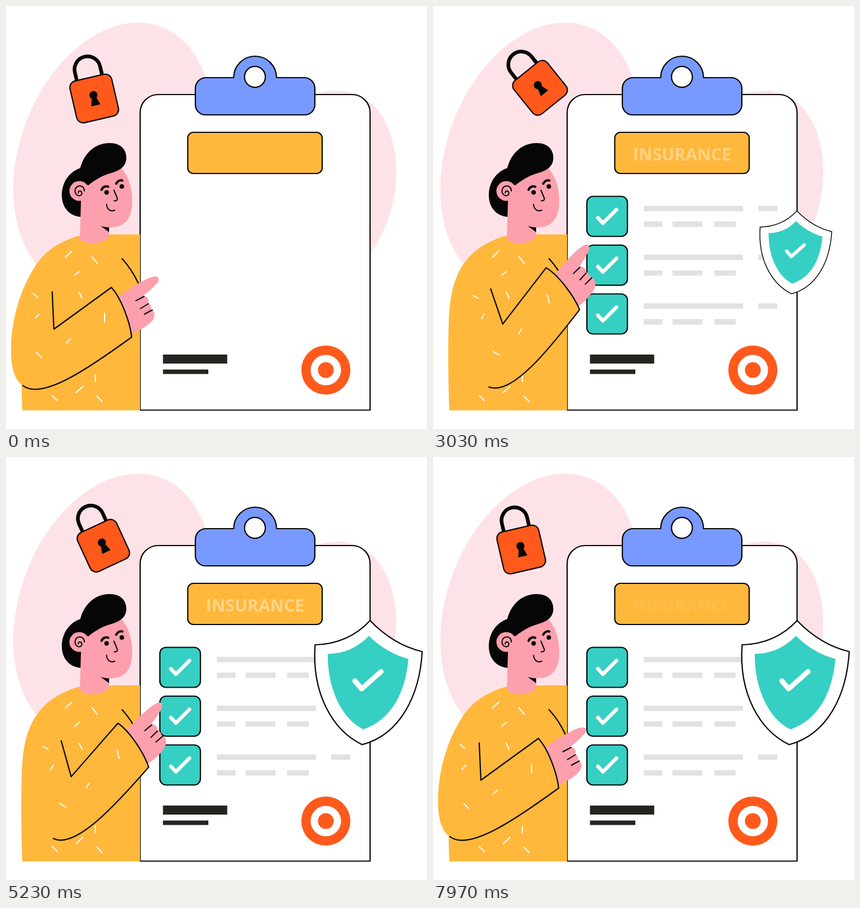
Recreate the animation shown at these times as an HTML page with a canvas. Size 747 by 750 pixels, loop 8.01 s.

```html
<!DOCTYPE html>
<html lang="en">
<head>
<meta charset="utf-8">
<title>Insurance checklist</title>
<style>
html, body { margin: 0; width: 100%; height: 100%; overflow: hidden; background: #fff; }
canvas { display: block; }
</style>
</head>
<body>
<canvas id="stage" width="747" height="750"></canvas>
<script>
const ctx = document.getElementById('stage').getContext('2d');
const LOOP = 8010;
const INK = '#060606', BLUSH = '#fde3e8', SKIN = '#fd9fad', YELLOW = '#ffb83b',
  ORANGE = '#ff591c', BLUE = '#7899ff', TEAL = '#36cfc3', GREY = '#e2e2e2', DARK = '#242520';
const ROWS = [373, 459.5, 546];

// ---- timing ----
const clamp = x => Math.min(1, Math.max(0, x));
const ease = (t, a, b) => { const x = clamp((t - a) / (b - a)); return x * x * (3 - 2 * x); };

// Smooth curve through [time, value] keys, at rest at both ends
function curve(keys, t) {
  const n = keys.length - 1;
  const slope = k => k === 0 || k === n ? 0 :
    (keys[k + 1][1] - keys[k - 1][1]) / (keys[k + 1][0] - keys[k - 1][0]);
  let i = 0;
  while (i < n - 1 && t >= keys[i + 1][0]) i++;
  const [t0, v0] = keys[i], [t1, v1] = keys[i + 1];
  const d = t1 - t0, u = clamp((t - t0) / d), w = 1 - u;
  return v0 * (1 + 2 * u) * w * w + slope(i) * d * u * w * w +
    v1 * u * u * (3 - 2 * u) - slope(i + 1) * d * u * u * w;
}

const LOCK_SWING = [[0, 0], [1030, 7.8], [2170, 21.2], [2900, 25.4], [3500, 26.6],
  [3730, 26.4], [4200, 24.6], [5230, 11.8], [6230, 3.7], [7200, 0.6], [8010, 0]];
const TITLE_FADE = [[0, 0], [1030, 0.03], [2170, 0.27], [3730, 0.45],
  [4200, 0.46], [5230, 0.41], [6230, 0.33], [7970, 0.08], [8010, 0.075]];
const ARM_LOWS = [0, 1935, 3895, 5905, 7815];

function armAngle(t) {
  for (let i = 0; i < ARM_LOWS.length - 1; i++) {
    const a = ARM_LOWS[i], b = ARM_LOWS[i + 1];
    if (t < b) return 8.5 * (1 - Math.cos(2 * Math.PI * (t - a) / (b - a)));
  }
  return 0;
}

function shieldScale(t) {
  return 1.1 * ease(t, 2470, 3450) - 0.1 * ease(t, 3450, 3950);
}

// ---- drawing helpers ----
function paint(path, fill, stroke, width = 2.2) {
  if (fill) { ctx.fillStyle = fill; ctx.fill(path); }
  if (stroke) { ctx.strokeStyle = stroke; ctx.lineWidth = width; ctx.stroke(path); }
}
const shape = (d, fill, stroke, width) => paint(new Path2D(d), fill, stroke, width);
function disc(x, y, r, fill, stroke, width) {
  const p = new Path2D();
  p.arc(x, y, r, 0, 7);
  paint(p, fill, stroke, width);
}
function box(x, y, w, h, r, fill, stroke) {
  const p = new Path2D();
  p.roundRect(x, y, w, h, r);
  paint(p, fill, stroke);
}
function bar(x, y, w, h, color) {
  ctx.fillStyle = color;
  ctx.fillRect(x, y, w, h);
}
// Draws around a pivot, turned counter-clockwise by deg and scaled
function around(x, y, deg, scale, draw) {
  if (scale <= 0) return;
  ctx.save();
  ctx.translate(x, y);
  ctx.rotate(-deg * Math.PI / 180);
  ctx.scale(scale, scale);
  draw();
  ctx.restore();
}

// ---- scene parts ----
function backdrop() {
  const blob = new Path2D();
  blob.ellipse(189.8, 265.9, 244.4, 165.6, -69.8 * Math.PI / 180, 0, 7);
  paint(blob, BLUSH);
  shape('M540 158C570 149 600 147 622 156C667 174 692.5 230 692.5 293C692.5 350 674 400 646 440H500Z', BLUSH);
}

function lock(t) {
  around(132, 81.8, 13 + curve(LOCK_SWING, t), 1, () => {
    ctx.translate(5.4, 0.6);
    ctx.lineCap = 'butt';
    shape('M-23 48V32A23 23 0 0 1 23 32V48', null, INK, 6.5);
    box(-38, 47, 76, 76, 12, ORANGE, INK);
    disc(0, 78.8, 7.2, INK);
    shape('M-3 80L-8.3 97.5H8.3L3 80Z', INK);
  });
}

function board(t) {
  box(238, 157, 408, 559.5, [32, 32, 0, 0], '#fff', INK);
  shape('M355 127H404A38 38 0 0 1 480 127H529A19 19 0 0 1 548 146V175A18 18 0 0 1 530 193' +
    'H354A18 18 0 0 1 336 175V146A19 19 0 0 1 355 127Z', BLUE, INK);
  disc(441.7, 125.7, 18.5, '#fff', INK);
  box(322.5, 224, 238.5, 73, 10, YELLOW, INK);

  ctx.globalAlpha = clamp(curve(TITLE_FADE, t));
  ctx.fillStyle = '#fff';
  ctx.font = 'bold 30px "Open Sans", "Noto Sans", sans-serif';
  ctx.textAlign = 'center';
  ctx.fillText('INSURANCE', 442, 274);
  ctx.globalAlpha = 1;

  bar(278.5, 618, 114, 16, DARK);
  bar(278.5, 644.5, 80.5, 8, DARK);
  disc(567.5, 645.5, 43.5, ORANGE);
  disc(567.5, 645.5, 27, '#fff');
  disc(567.5, 645.5, 14, ORANGE);
}

function checklist(t) {
  const tick = ease(t, 960, 1960), text = ease(t, 1650, 2630);
  for (const y of ROWS) {
    around(309, y, 0, tick, () => {
      box(-36, -35.5, 72, 71, 11, TEAL, INK);
      ctx.lineCap = ctx.lineJoin = 'round';
      shape('M-16.5 2.5L-7.5 12L16.5 -12', null, '#fff', 6.5);
      ctx.lineCap = 'butt';
    });
    around(374, y, 0, text, () => {
      bar(0, -18.7, 176, 9.6, GREY);
      bar(203, -18.7, 34, 9.6, GREY);
      bar(0, 9.2, 33, 9.6, GREY);
      bar(51, 9.2, 53, 9.6, GREY);
      bar(125, 9.2, 38, 9.6, GREY);
    });
  }
}

function shield(t) {
  around(645, 511, 0, shieldScale(t), () => {
    ctx.translate(-645, -511);
    ctx.lineJoin = 'miter';
    shape('M646 290C672 317 704 337 738.5 345C734 422 700 492 632 510C580 485 542 420 548.5 333' +
      'C586 332 620 318 646 290Z', '#fff', INK);
    shape('M644 317C663 336 687 351 714 358C709 415 686 465 634 483C594 463 570 408 571 349' +
      'C599 349 624 338 644 317Z', TEAL);
    ctx.lineCap = ctx.lineJoin = 'round';
    shape('M619 397L631 411L665.5 380.5', null, '#fff', 9);
    ctx.lineCap = 'butt';
  });
}

function man(t) {
  ctx.lineCap = 'butt';
  ctx.lineJoin = 'round';
  shape('M29 717C27 680 26 580 29 540C33 492 46 462 70 439C88 423 112 411 135 406L183 405H238V717Z', YELLOW);

  // head
  shape('M133 287C113 293 99 312 99 335C99 358 113 373 134 374L142 320Z', INK);
  shape('M146 306L200 282L207 290C219 306 224 325 224 347C224 374 212 391.5 190 392L183 393V409' +
    'C172 424 140 424 131 413L133.5 330Z', SKIN);
  shape('M168 390C173 391.5 178 392.3 183 392.5V401Z', INK);
  shape('M131 291C136 265 155 243 184 243C205 243 214 256 213.5 270C213 286 200 292 187 296' +
    'C172 300 158 308 146 318L131 311Z', INK);
  disc(130, 328, 17.5, SKIN);
  ctx.lineCap = 'round';
  shape('M139 328C139 321 134 318.5 130 319C125 319.5 122 324 122.5 329C123 334 128 337.5 132 336' +
    'C136 334 135 328 131 328C129 328 127.5 329.5 128.5 331.5', null, INK, 2);

  // face
  shape('M169.5 326C172 320.5 177 318.5 181.5 320.5', null, INK, 4);
  shape('M195.5 315C198 310 203 308 206.5 309.5', null, INK, 4);
  shape('M191.5 326.5L197.5 341C198.5 344 196 345.5 192 345.5', null, INK, 2);
  shape('M178.5 351.5C179 361 186 365.5 193 362', null, INK, 2);
  ctx.globalAlpha = clamp(Math.abs(t - 1090) / 110);
  disc(178.5, 330.5, 4, INK);
  disc(205.5, 320, 4, INK);
  ctx.globalAlpha = 1;

  ctx.lineCap = 'butt';
  shape('M105 446L117 434M152 444L162.5 457M121 478L131 470M129.5 507L135.5 519M158.5 653.5V667' +
    'M124 686L137 674M81.5 690L91.5 700M160.5 691L171 702', null, '#fff', 2);
  ctx.lineCap = 'round';
  shape('M206 448C216 459 228 477 235 492', null, INK);
}

function arm(t) {
  around(73, 434, armAngle(t), 1, () => {
    ctx.translate(-73, -434);
    shape('M198 515C220 501 245 484 261 480C272 477 274 486 267 492.5C260 501 251 508 243 514' +
      'C250 514 255 520 252.5 526C256 528 258 533 258 538C266 541 264.5 553 258 559.5' +
      'C248 570 235 576 220 582Z', SKIN);
    shape('M230.5 522.5L245 515M238.5 536.5L252.5 528M245.5 546.5L259.5 539', null, INK, 2);
    shape('M75 438C45 458 9 530 9 612C9 645 17 665 30 673C64 700 150 640 223 587' +
      'C220 560 204 517 187 499L85 573L82 507Z', YELLOW);
    shape('M82 507L85 573L187 499C204 517 220 560 223 587C150 640 64 700 30 673', null, INK);
    ctx.lineCap = 'butt';
    shape('M48 509L57 517.5M51 554L59 546M54 614L64 624M106.5 598L115 590M175 544V561', null, '#fff', 2);
  });
}

function frame(now) {
  const t = now % LOOP;
  ctx.fillStyle = '#fff';
  ctx.fillRect(0, 0, 747, 750);
  ctx.lineJoin = 'round';
  backdrop();
  lock(t);
  board(t);
  checklist(t);
  shield(t);
  man(t);
  arm(t);
}

const start = performance.now();
function loop() {
  frame(performance.now() - start);
  requestAnimationFrame(loop);
}
loop();
</script>
</body>
</html>
```
